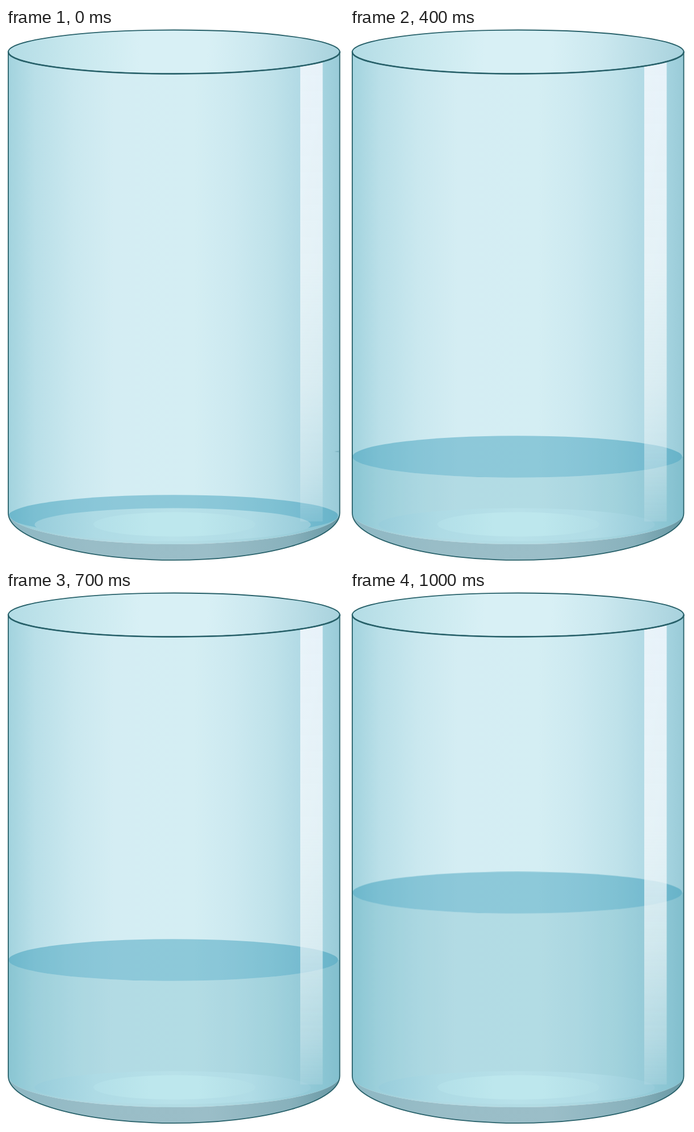
An HTML page that plays this animation: 595 by 941 pixels, repeating every 1.1 s.

```html
<!DOCTYPE html>
<html lang="en">
<head>
<meta charset="utf-8">
<title>Filling glass</title>
<style>
  html, body { margin: 0; width: 100%; height: 100%; overflow: hidden; background: #fff; }
  svg { display: block; width: 595px; height: 941px; }
  .water { animation: fill 1100ms step-end infinite; }
  .tick { animation: blink 1100ms step-end infinite; }
  @keyframes fill {
    0% { transform: translateY(858px); }
    9.0909% { transform: translateY(834px); }
    18.1818% { transform: translateY(809.5px); }
    27.2727% { transform: translateY(780.5px); }
    36.3636% { transform: translateY(754px); }
    45.4545% { transform: translateY(728px); }
    54.5455% { transform: translateY(688.5px); }
    63.6364% { transform: translateY(649px); }
    72.7273% { transform: translateY(609.5px); }
    81.8182% { transform: translateY(570px); }
    90.9091%, 100% { transform: translateY(530.5px); }
  }
  @keyframes blink {
    0% { opacity: 1; }
    9.0909%, 100% { opacity: 0; }
  }
</style>
</head>
<body>
<svg viewBox="0 0 595 941">
  <defs>
    <linearGradient id="glass" gradientUnits="userSpaceOnUse" x1="4" x2="587" y1="0" y2="0">
      <stop offset="0" stop-color="#a2d3de"/>
      <stop offset=".08" stop-color="#b9dfe8"/>
      <stop offset=".2" stop-color="#cae8ef"/>
      <stop offset=".32" stop-color="#d4edf3"/>
      <stop offset=".56" stop-color="#d4eef3"/>
      <stop offset=".68" stop-color="#cce9f0"/>
      <stop offset=".8" stop-color="#bfe2ea"/>
      <stop offset=".88" stop-color="#b2dae5"/>
      <stop offset=".95" stop-color="#a4d3df"/>
      <stop offset="1" stop-color="#9acbd8"/>
    </linearGradient>
    <linearGradient id="mouth" gradientUnits="userSpaceOnUse" x1="4" x2="587" y1="30" y2="52">
      <stop offset="0" stop-color="#b3dce5"/>
      <stop offset=".2" stop-color="#c8e8ee"/>
      <stop offset=".4" stop-color="#d8f0f5"/>
      <stop offset=".6" stop-color="#d8f0f5"/>
      <stop offset=".75" stop-color="#cbe8ef"/>
      <stop offset="1" stop-color="#a8d2dd"/>
    </linearGradient>
    <linearGradient id="shine" gradientUnits="userSpaceOnUse" x1="0" x2="0" y1="60" y2="868">
      <stop offset="0" stop-color="#f2f7fd" stop-opacity=".86"/>
      <stop offset=".45" stop-color="#f2f8fb" stop-opacity=".81"/>
      <stop offset=".7" stop-color="#f2f8fa" stop-opacity=".65"/>
      <stop offset=".9" stop-color="#f2f8fa" stop-opacity=".36"/>
      <stop offset="1" stop-color="#f2f8fa" stop-opacity=".12"/>
    </linearGradient>
    <linearGradient id="floor" gradientUnits="userSpaceOnUse" x1="50" x2="537" y1="0" y2="0">
      <stop offset="0" stop-color="#98cddb"/>
      <stop offset=".22" stop-color="#aedbe5"/>
      <stop offset=".5" stop-color="#b8e1e9"/>
      <stop offset=".78" stop-color="#b0dce6"/>
      <stop offset="1" stop-color="#97cbd9"/>
    </linearGradient>
    <linearGradient id="center" gradientUnits="userSpaceOnUse" x1="154" x2="439" y1="0" y2="0">
      <stop offset="0" stop-color="#b2dfe8"/>
      <stop offset=".35" stop-color="#bde7ed"/>
      <stop offset=".65" stop-color="#bde7ed"/>
      <stop offset="1" stop-color="#b1dde6"/>
    </linearGradient>
    <linearGradient id="base" gradientUnits="userSpaceOnUse" x1="4" x2="587" y1="0" y2="0">
      <stop offset="0" stop-color="#8db7c3"/>
      <stop offset=".25" stop-color="#99bdc7"/>
      <stop offset=".6" stop-color="#9bbec8"/>
      <stop offset=".85" stop-color="#88b1bc"/>
      <stop offset="1" stop-color="#6797a3"/>
    </linearGradient>
    <clipPath id="inside">
      <path d="M4 40V853A291.75 55 0 0 0 587.5 853V40Z"/>
    </clipPath>
  </defs>

  <g clip-path="url(#inside)">
    <rect x="4" y="40" width="583.5" height="880" fill="url(#glass)"/>
    <g class="water">
      <path d="M4.5 0A290 36.7 0 0 0 584.5 0H587V420H4Z" fill="#208aa2" fill-opacity=".18"/>
      <ellipse cx="294.5" rx="290" ry="36.7" fill="#0a84a8" fill-opacity=".35"/>
    </g>
    <ellipse cx="293.5" cy="873.5" rx="243" ry="29" fill="url(#floor)"/>
    <ellipse cx="296.5" cy="873" rx="142.5" ry="21.5" fill="url(#center)"/>
    <rect x="518" y="60" width="39.5" height="808" fill="url(#shine)"/>
  </g>

  <path d="M4 853A291.75 55 0 0 0 587.5 853A291.75 83 0 0 1 4 853Z" fill="url(#base)"/>
  <path class="tick" d="M578 745L586 743.5V746.5Z" fill="#7fb5c4"/>

  <g fill="none" stroke="#28616a" stroke-width="1.8">
    <path d="M4 40V853A291.75 83 0 0 0 587.5 853V40"/>
    <ellipse cx="295.75" cy="42" rx="291.75" ry="38.5" fill="url(#mouth)" stroke-width="1.8"/>
    <path d="M4 42A291.75 38.5 0 0 0 587.5 42" stroke-width="2.5"/>
  </g>
</svg>
</body>
</html>
```
